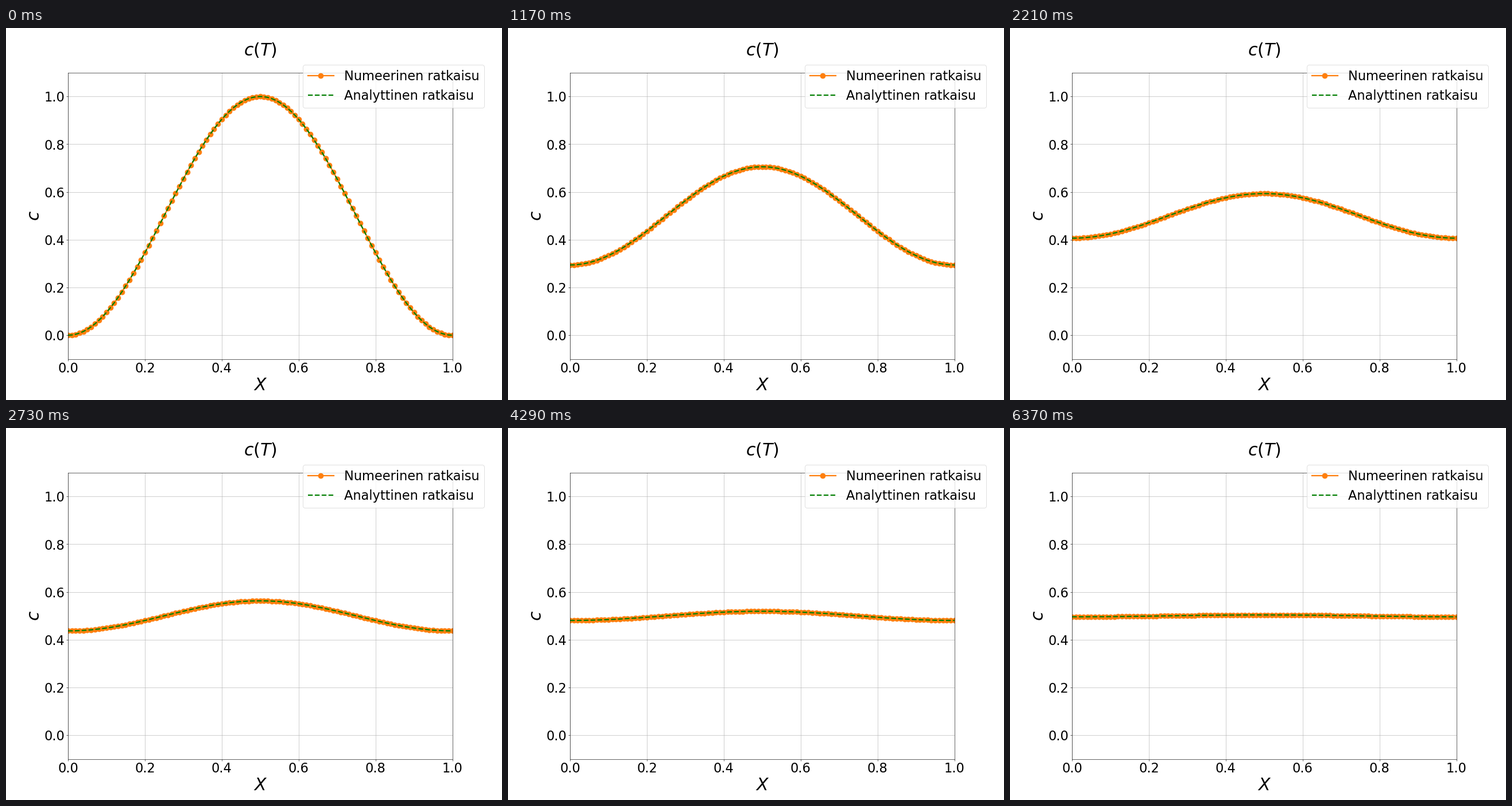
Animation, 864 px wide and 648 px high, one loop 6500 ms. Source, as a matplotlib script:

```python
import numpy as np
import matplotlib.pyplot as plt
from matplotlib.animation import FuncAnimation

FRAMES = 50
INTERVAL = 130
TIME_STEP = 0.0025

plt.rcParams["font.family"] = "DejaVu Sans"
plt.rcParams["font.size"] = 30

x = np.linspace(0, 1, 101)


def concentration(t):
    """Diffusion of a cosine profile with closed ends."""
    return 0.5 * (1 - np.exp(-4 * np.pi**2 * t) * np.cos(2 * np.pi * x))


fig, ax = plt.subplots(figsize=(16, 12), dpi=54)
numeric, = ax.plot(x, concentration(0), "o-", color="tab:orange", lw=3,
                   markersize=12, label="Numeerinen ratkaisu")
analytic, = ax.plot(x, concentration(0), "--", color="green", lw=3,
                    label="Analyttinen ratkaisu")

ax.set_xlim(0, 1)
ax.set_ylim(-0.1, 1.1)
ax.set_xticks(np.arange(0, 1.1, 0.2))
ax.set_yticks(np.arange(0, 1.1, 0.2))
ax.grid(True)
ax.set_title("$c(T)$", fontsize=40, y=1.05)
ax.set_xlabel("$X$", fontsize=40)
ax.set_ylabel("$c$", fontsize=40)
ax.legend(loc="upper right", bbox_to_anchor=(1.1, 1.05), fontsize=30)


def update(frame):
    profile = concentration(frame * TIME_STEP)
    numeric.set_ydata(profile)
    analytic.set_ydata(profile)
    return numeric, analytic


animation = FuncAnimation(fig, update, frames=FRAMES, interval=INTERVAL,
                          repeat=True, repeat_delay=0)
plt.show()
```
